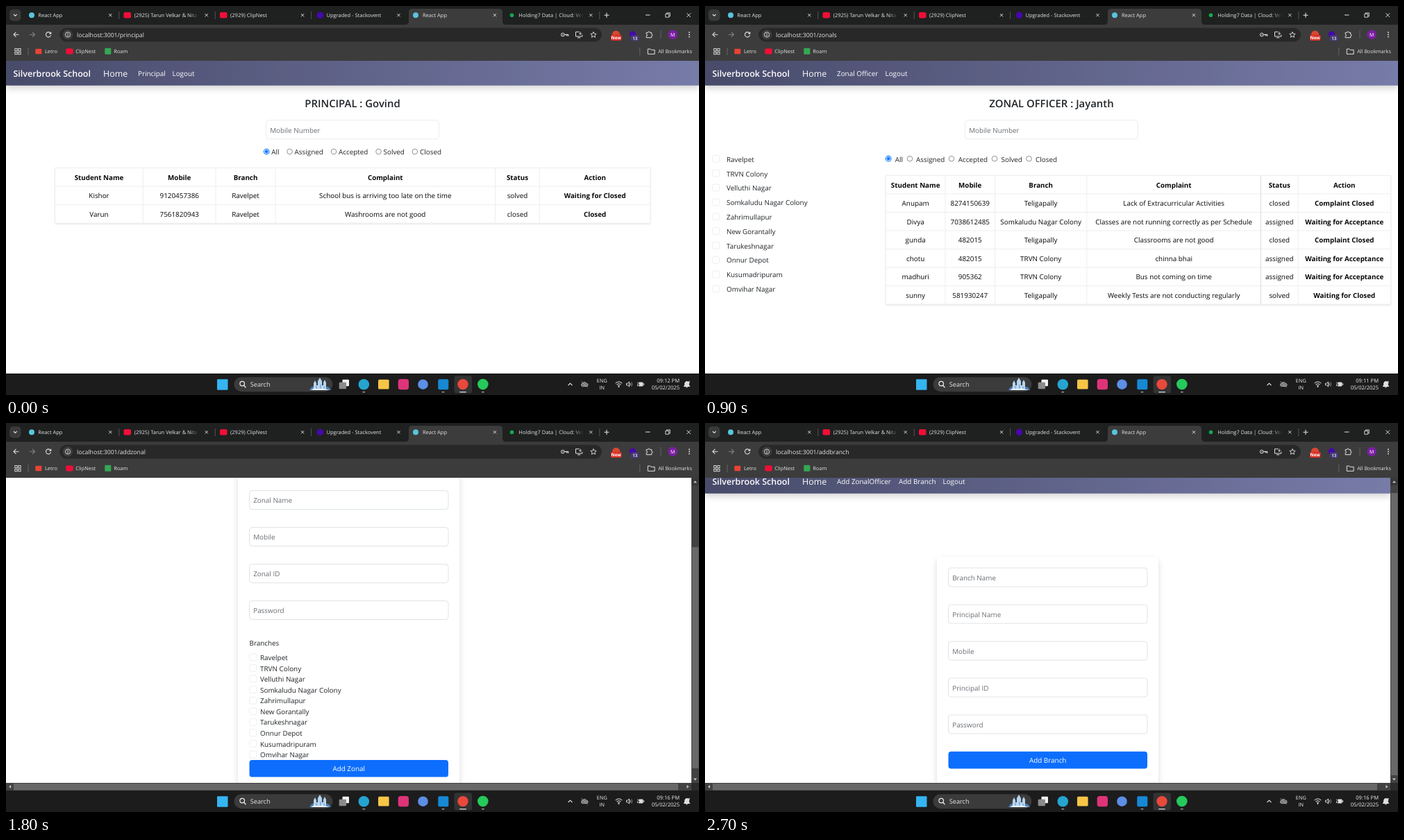
These frames come from a looping animation (998 px wide and 561 px high, 3600 ms). An HTML page:

```html
<!DOCTYPE html>
<html lang="en">
<head>
<meta charset="utf-8">
<title>School complaints</title>
<style>
html,body{margin:0;width:100%;height:100%;overflow:hidden;background:#fff}
svg{display:block;width:100%;height:100%;font-family:"Open Sans","Noto Sans",sans-serif;text-rendering:geometricPrecision}
text{white-space:pre}
</style>
</head>
<body>
<svg id="stage" viewBox="0 0 998 561" xmlns="http://www.w3.org/2000/svg">
  <defs>
    <linearGradient id="navFill"><stop offset="0" stop-color="#484b6a"/><stop offset="1" stop-color="#777ba8"/></linearGradient>
    <linearGradient id="fadeTab"><stop offset="0" stop-color="#1f2020" stop-opacity="0"/><stop offset="1" stop-color="#1f2020"/></linearGradient>
    <filter id="navShade" x="-5%" y="-50%" width="110%" height="220%"><feDropShadow dx="0" dy="5" stdDeviation="4.5" flood-opacity=".15"/></filter>
    <filter id="cardShade" x="-10%" y="-10%" width="120%" height="120%"><feDropShadow dx="0" dy="4" stdDeviation="4" flood-opacity=".14"/></filter>
    <filter id="tableShade" x="-5%" y="-5%" width="110%" height="115%"><feDropShadow dx="0" dy="1.3" stdDeviation="1.2" flood-opacity=".13"/></filter>
    <clipPath id="view"><rect y="79" width="998" height="451"/></clipPath>
  </defs>
  <g id="page" clip-path="url(#view)"></g>
  <g id="chrome"></g>
  <g id="bar"></g>
  <g id="live"></g>
</svg>
<script>
const $ = id => document.getElementById(id);
const LINE = '#dfe3e7', PALE = '#e9ecef', INK = '#212529', HINT = '#6a6e73', BODY = 9.9, BOLD = 9.8;

const text = (x, y, s, size = BODY, fill = INK, anchor = 'start', weight = 400) =>
  `<text x="${x}" y="${y}" font-size="${size}" fill="${fill}" text-anchor="${anchor}" font-weight="${weight}">${s.replace(/&/g, '&amp;')}</text>`;
const rect = (x, y, w, h, fill, r = 0, more = '') =>
  `<rect x="${x}" y="${y}" width="${w}" height="${h}" fill="${fill}" rx="${r}" ${more}/>`;
const disc = (x, y, r, fill, more = '') => `<circle cx="${x}" cy="${y}" r="${r}" fill="${fill}" ${more}/>`;
const ring = (x, y, r, color, w = 1) => disc(x, y, r, 'none', `stroke="${color}" stroke-width="${w}"`);
const path = (d, color = '#dcdcdc', w = 1, fill = 'none') =>
  `<path d="${d}" fill="${fill}" stroke="${color}" stroke-width="${w}" stroke-linejoin="round"/>`;
const cross = (x, y, r) => path(`M${x - r} ${y - r}l${2 * r} ${2 * r}m0 ${-2 * r}l${-2 * r} ${2 * r}`, '#dedede', .95);

const branches = ['Ravelpet', 'TRVN Colony', 'Velluthi Nagar', 'Somkaludu Nagar Colony', 'Zahrimullapur',
  'New Gorantally', 'Tarukeshnagar', 'Onnur Depot', 'Kusumadripuram', 'Omvihar Nagar'];
const heads = ['Student Name', 'Mobile', 'Branch', 'Complaint', 'Status', 'Action'];

// Page parts
function nav(links, y = 79, w = 998) {
  return rect(0, y, w, 35.7, 'url(#navFill)', 0, 'filter="url(#navShade)"') +
    text(10.5, y + 23, 'Silverbrook School', 12.5, '#fff', 'start', 600) +
    text(140, y + 23, 'Home', 12.4, '#fff') +
    links.map(([x, s]) => text(x, y + 22.2, s, BODY, '#fff', 'start', 500)).join('');
}
const input = (x, y, w, label, line = LINE) =>
  rect(x, y, w, 27, '#fff', 4, `stroke="${line}"`) + text(x + 5.7, y + 17.8, label, BODY, HINT);
const checkbox = (x, y) => rect(x, y, 10, 10, '#fff', 2.4, `stroke="${PALE}" stroke-width=".9"`);

function radios(y, spots) {
  return ['All', 'Assigned', 'Accepted', 'Solved', 'Closed'].map((s, i) => {
    const [x, tx] = spots[i];
    return ring(x, y, 3.8, i ? '#767676' : '#0d75ff', i ? .8 : 1.1) +
      (i ? '' : disc(x, y, 2.4, '#0d75ff')) + text(tx, y + 4.3, s);
  }).join('');
}
function table(cols, y, rows) {
  const step = 26.55, h = step * (rows.length + 1), left = cols[0], right = cols[6];
  let out = rect(left, y, right - left, h, '#fff', 0, 'filter="url(#tableShade)"');
  let d = '';
  for (let i = 0; i <= rows.length + 1; i++) d += `M${left} ${y + i * step}H${right}`;
  for (const x of cols) d += `M${x} ${y}v${h}`;
  out += path(d, PALE, .9);
  [heads, ...rows].forEach((row, r) => row.forEach((s, c) => {
    const bold = !r || c === 5;
    out += text((cols[c] + cols[c + 1]) / 2, y + r * step + 17.3, s, bold ? BOLD : BODY, '#080808', 'middle', bold ? 700 : 400);
  }));
  return out;
}
const heading = s => text(499, 146, s, 14.9, INK, 'middle', 600);
const search = () => input(374.5, 164.8, 249, 'Mobile Number', PALE);
const button = (y, s) => rect(350.5, y, 286.5, 24.6, '#0d6efd', 4) + text(493.7, y + 16.3, s, BODY, '#fff', 'middle', 500);
const card = y => rect(334, y, 319, 480, '#fff', 5, 'filter="url(#cardShade)"');
const fields = (y, list) => list.map((s, i) => input(350.5, y + i * 53, 286.5, s)).join('');
function scrollbars(top, bottom) {
  const tri = d => `<path d="${d}" fill="#c8c8c8"/>`;
  return rect(987, 79, 11, 451, '#424242') + rect(0, 519, 998, 11, '#424242') +
    rect(988, top, 9.5, bottom - top, '#686868') + rect(11, 520, 957, 9.5, '#686868') +
    rect(987, 519, 11, 11, '#2b2b2b') + rect(987, 79, 11, 11, '#383838') +
    tri('M990 86.2h5l-2.5-3z') + tri('M990 512.5h5l-2.5 3z') +
    tri('M7.2 522v5l-3-2.5z') + tri('M980.5 522v5l3-2.5z');
}

const pages = [
  {
    url: 'principal', clock: '09:12 PM',
    art: () => nav([[190, 'Principal'], [239.5, 'Logout']]) + heading('PRINCIPAL : Govind') + search() +
      radios(210, [[375.2, 382.3], [408.6, 415.6], [472, 479], [536.5, 543.5], [588.8, 596]]) +
      table([70.5, 197.5, 302, 388, 704.5, 768.5, 927.8], 233.5, [
        ['Kishor', '9120457386', 'Ravelpet', 'School bus is arriving too late on the time', 'solved', 'Waiting for Closed'],
        ['Varun', '7561820943', 'Ravelpet', 'Washrooms are not good', 'closed', 'Closed']])
  },
  {
    url: 'zonals', clock: '09:11 PM',
    art: () => nav([[190, 'Zonal Officer'], [259.5, 'Logout']]) + heading('ZONAL OFFICER : Jayanth') + search() +
      branches.map((s, i) => checkbox(10.5, 215.4 + i * 20.82) + text(31, 224.7 + i * 20.82, s)).join('') +
      radios(220.2, [[264.2, 273.8], [295, 304], [355, 364.7], [417, 426.5], [466.5, 476]]) +
      table([260.3, 346, 417.5, 549.8, 800.5, 854, 987.5], 244.3, [
        ['Anupam', '8274150639', 'Teligapally', 'Lack of Extracurricular Activities', 'closed', 'Complaint Closed'],
        ['Divya', '7038612485', branches[3], 'Classes are not running correctly as per Schedule', 'assigned', 'Waiting for Acceptance'],
        ['gunda', '482015', 'Teligapally', 'Classrooms are not good', 'closed', 'Complaint Closed'],
        ['chotu', '482015', branches[1], 'chinna bhai', 'assigned', 'Waiting for Acceptance'],
        ['madhuri', '905362', branches[1], 'Bus not coming on time', 'assigned', 'Waiting for Acceptance'],
        ['sunny', '581930247', 'Teligapally', 'Weekly Tests are not conducting regularly', 'solved', 'Waiting for Closed']]) +
      path('M800.5 244.3v185.8', '#d3d6d9', .8)
  },
  {
    url: 'addzonal', clock: '09:16 PM',
    art: () => card(70) + fields(97.5, ['Zonal Name', 'Mobile', 'Zonal ID', 'Password']) +
      text(350.5, 321.3, 'Branches') +
      branches.map((s, i) => checkbox(350.8, 332.8 + i * 15.58) + text(366, 342 + i * 15.58, s)).join('') +
      button(486, 'Add Zonal') + scrollbars(179, 498)
  },
  {
    url: 'addbranch', clock: '09:16 PM',
    art: () => nav([[190, 'Add ZonalOfficer'], [279, 'Add Branch'], [342.5, 'Logout']], 66, 987) +
      card(193) + fields(209, ['Branch Name', 'Principal Name', 'Mobile', 'Principal ID', 'Password']) +
      button(473.8, 'Add Branch') + scrollbars(101, 508)
  }
];

// Browser frame
function browser() {
  const ui = '#e3e3e3', bg = '#3c3c3c';
  let o = rect(0, 0, 998, 28, '#1f2020') + rect(0, 27, 998, 52, bg);
  o += rect(5, 5, 16.5, 16.5, '#3a3a3a', 5) + path('M11 12l2.3 2.3 2.3-2.3', ui, 1.1);
  o += `<path d="M575 27q5 0 5-5V9q0-5 5-5H710q5 0 5 5v13q0 5 5 5z" fill="${bg}"/>`;
  const tabs = ['React App', '(2925) Tarun Velkar & Nita', '(2929) ClipNest', 'Upgraded - Stackovent', 'React App', 'Holding7 Data | Cloud: Vel'];
  tabs.forEach((s, i) => {
    const x = 46.3 + i * 138.4;
    o += text(x, 16, s, 7.5, ui);
    if (i === 1 || i === 5) o += rect(x + 80, 5, 12, 18, 'url(#fadeTab)') + rect(x + 92, 5, 10, 18, '#1f2020');
    o += cross(x + 104, 13.2, 2.1);
    if (i < 3 || i === 5) o += rect(x + 116, 8, 1, 11, '#555');
  });
  o += disc(37, 13.2, 4, '#58c4dc') + disc(590, 13.2, 4, '#58c4dc') + rect(169.5, 9, 10.5, 8.5, '#f00f37', 2) +
    rect(308, 9, 10.5, 8.5, '#f00f37', 2) + disc(452.5, 13.3, 4.8, '#4608ad') + disc(728.5, 13.3, 2.8, '#13aa52');
  o += path('M861.5 13.2h7m-3.5-3.5v7', ui, 1.1);
  o += path('M921 13h6.5', ui) + path('M949.8 11.4h4.8v4.8h-4.8zM951.3 11.2v-1.3h5v5h-1.3', ui, .9) + cross(983.2, 13.2, 2.8);

  o += path('M18.5 41.2h-7.4m3.4-3.5l-3.5 3.5 3.5 3.5', ui, 1.1) + path('M34 41.2h7.4m-3.4-3.5l3.5 3.5-3.5 3.5', '#858585', 1.1) +
    path('M64.2 39.4a3.6 3.6 0 1 0 .4 2.6M64.8 37.4v2.6h-2.6', ui, 1.1);
  o += rect(77, 31.5, 781, 20, '#282828', 10) + disc(89, 41.3, 7.2, '#3d3d3d') + ring(89, 41.3, 3.6, ui, .9) +
    rect(88.5, 40.7, 1, 2.7, ui) + rect(88.5, 39.1, 1, 1, ui);
  o += ring(801.8, 41.4, 2.4, ui) + disc(801.8, 41.4, .7, ui) + path('M804.2 41.4h5.6v2.2m-2-2v2', ui, 1.1);
  o += path('M825.5 37.3h-5v6.6h9.4v-2.4m-6.8 4.3h4m0-8.5v3.8m-1.8-1.7l1.8 1.8 1.8-1.8', ui);
  let star = '';
  for (let i = 0; i < 10; i++) {
    const r = i % 2 ? 2 : 4.4, a = i * Math.PI / 5;
    star += `${i ? 'L' : 'M'}${846 + r * Math.sin(a)} ${41.6 - r * Math.cos(a)}`;
  }
  o += path(star + 'z', ui, .9);
  o += disc(878.5, 41, 5.5, '#d9472f') + rect(871, 41.5, 15.5, 8.5, '#d93025', 2) + text(878.7, 48.4, 'New', 6.4, '#fff', 'middle', 700);
  o += disc(902.5, 41, 4.7, '#4608ad') + rect(900, 42, 11.5, 8.5, '#463a78', 2) + text(905.7, 48.7, '13', 6.2, '#fff', 'middle', 600);
  o += path('M922.2 38.3h2.3a1.3 1.3 0 0 1 2.6 0h2.6v2.5a1.3 1.3 0 0 1 0 2.6v2.3h-7.5v-2.3a1.3 1.3 0 0 0 0-2.6z', ui);
  o += rect(942.5, 35, 1, 12, '#606060') + disc(960.2, 41.2, 6.8, '#7b1fa2') + text(960.2, 43.8, 'M', 7, '#fff', 'middle');
  for (const dy of [-3.2, 0, 3.2]) o += disc(984, 41.2 + dy, .95, ui);

  for (const x of [12.8, 17.8]) for (const y of [61.4, 66.4]) o += rect(x, y, 3.3, 3.3, 'none', 0, `stroke="${ui}" stroke-width=".9"`);
  o += rect(31.5, 60, 1, 11, '#666') + rect(42.3, 61.8, 9, 7.4, '#ea4335', 1) + text(56, 68.3, 'Letro', 7.4, ui);
  o += rect(86.3, 61.3, 10.4, 8.2, '#f00f37', 2) + text(100.3, 68.3, 'ClipNest', 7.4, ui);
  o += rect(142.3, 60.8, 9, 9, '#34a853', 1) + text(155.3, 68.3, 'Roam', 7.4, ui);
  o += rect(912.3, 60, 1, 11, '#666') + path('M924.3 62h3.6l1.2 1.3h5v6h-9.8z', ui) + text(939.2, 68.3, 'All Bookmarks', 7.3, ui);
  return o;
}

function taskbar() {
  const ui = '#eee';
  let o = rect(0, 530, 998, 31, '#1c1c1d');
  o += rect(304, 538.3, 15.5, 15.5, '#35b5f2', 1);
  o += rect(328.5, 535.2, 142, 21, '#3b3b3c', 10.5) + ring(340.2, 544.6, 3.3, ui, 1.2) + path('M342.6 547.2l2.8 3', ui, 1.3) + text(351.7, 549.2, 'Search', 9.2, '#e6e6e6');
  // ice castle in the search box
  o += path('M437 554q4-7 8-5l3-2h9l4 2q5 0 7 5z', 'none', 0, '#4e7fb5') +
    path('M443 552v-8l2-4 2 4v3h2v-6l3-5 3 5v6h2v-4l2-4 2 4v9z', 'none', 0, '#b6d5ee') +
    path('M439 554l5-3 6 1 6-1 10 3z', 'none', 0, '#e7f2fa') + path('M447 552v-4m6 4v-6m5 6v-3', '#5f8fc4', 1);
  o += rect(484.5, 538.7, 9.5, 9.5, '#f0f0f0', 1) + rect(479.7, 542.7, 10.3, 9.5, '#8b8b8b', 1);
  o += disc(515.3, 545.7, 7.8, '#25a4cf') + rect(536, 538.8, 15.6, 13.8, '#f7c546', 1.5) +
    rect(564.7, 537.9, 15.3, 15.3, '#dd3478', 3.5) + disc(600.5, 545.7, 7.3, '#5c8fe5') + rect(622.3, 538.2, 15, 15, '#1688d4', 2);
  o += rect(645.5, 533.5, 25.5, 25, '#333334', 3) + disc(658, 545.6, 7.7, '#e9493b') + disc(686.8, 545.6, 7.8, '#26c95b');
  for (const x of [515.3, 629.5, 686.8]) o += rect(x - 2, 556, 4, 1.5, '#9b9b9b', .7);
  o += rect(653, 556, 10, 1.6, '#b9c3cc', .8);
  o += path('M809.5 547.2l3-3 3 3', ui, 1.1) + path('M830.2 548.6a2.3 2.3 0 0 1 .2-4.5q3-3.4 5.3 0a2.3 2.3 0 0 1 .8 4.5zM828.6 541.6l9 8.2', '#a9a9a9', 1, '#777');
  o += text(858.3, 543.4, 'ENG', 7.3, ui, 'middle') + text(858.3, 553.4, 'IN', 7.3, ui, 'middle');
  o += path('M877.7 544q4.8-4.2 9.6 0M879.4 545.9q3.1-2.6 6.2 0M881 547.6q1.5-1.2 3 0', ui, 1) + disc(882.5, 549, .9, ui);
  o += path('M893.5 544.2h1.7l2.3-2.2v7l-2.3-2.2h-1.7z', ui, .9) + path('M899 543.8q1.4 1.8 0 3.6', ui, .9) + path('M900.7 542.3q2.6 3.2 0 6.5', '#888', .9);
  o += rect(909, 542.6, 8.6, 5.8, '#ddd', 1.3) + rect(918, 544.3, 1.1, 2.4, '#ddd') + path('M911.8 541.3l-2.4 4h2l-1.2 4', '#1c1c1d', 1.1);
  o += text(970, 553.3, '05/02/2025', 7.6, ui, 'end');
  o += path('M976.3 548.5l1.4-2v-2.2q.4-2.8 2.8-2.8t2.8 2.8v2.2l1.4 2zM979.2 549.8h2.4', ui, 1, '#ddd') + text(982.2, 544, 'z', 5.5, '#fff', 'start', 700);
  return o;
}

let shown = -1;
function draw(ms) {
  const k = Math.floor(ms % 3600 / 900);
  if (k === shown) return;
  shown = k;
  const p = pages[k];
  $('page').innerHTML = rect(0, 79, 998, 451, '#fff') + p.art();
  $('live').innerHTML = text(102, 44.6, 'localhost:3001/' + p.url, 8.7, '#e6e6e6') + text(970, 543.2, p.clock, 7.6, '#eee', 'end');
}

$('chrome').innerHTML = browser();
$('bar').innerHTML = taskbar();
const start = performance.now();
function tick() {
  draw(performance.now() - start);
  requestAnimationFrame(tick);
}
tick();
</script>
</body>
</html>
```
